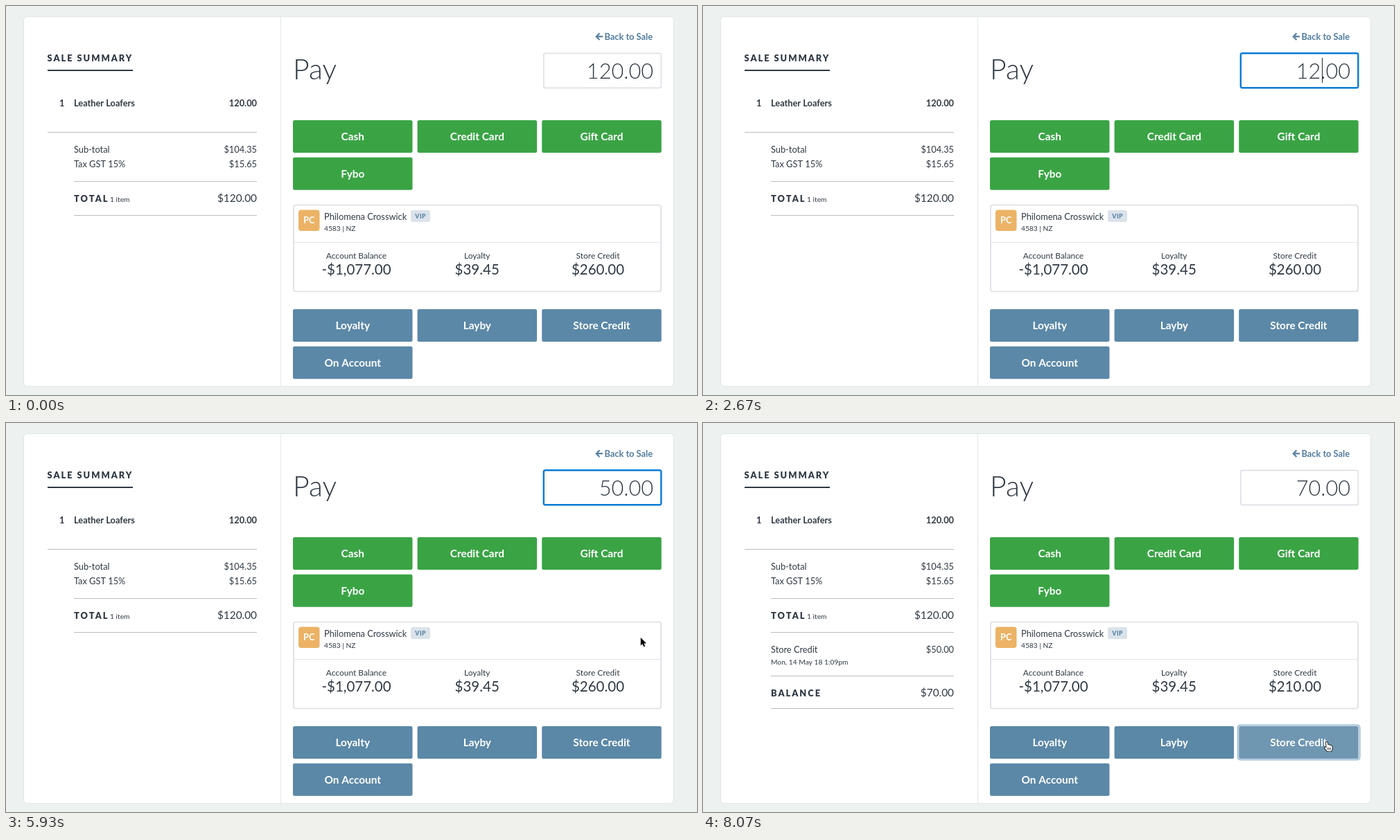
Animation, 997 px wide and 562 px high, one loop 8.59 s. Source, as an HTML page with a canvas:

```html
<!DOCTYPE html>
<html lang="en">
<head>
<meta charset="utf-8">
<title>Pay</title>
<style>
html, body { margin: 0; width: 100%; height: 100%; overflow: hidden; background: #edf1f0; }
canvas { display: block; }
</style>
</head>
<body>
<canvas id="stage" width="997" height="562"></canvas>
<script>
const ctx = document.getElementById('stage').getContext('2d');
const LOOP = 8590;
const INK = '#2f3944', GREEN = [58, 164, 69], BLUE = [91, 136, 167];
const EDGE = [221, 224, 230], FOCUS = [10, 123, 214];

// Key moments in ms
const CLICK = 1670, PRESS = 7200, PAID = 7470;
const KEYS = [
  [0, '120'], [2530, '12'], [2870, '1'], [3180, ''], [3870, '5'], [4060, '50'], [PAID, '70']
];

const clamp = v => Math.max(0, Math.min(1, v));
const ramp = (t, from, span) => clamp((t - from) / span);
const smooth = p => p * p * (3 - 2 * p);
const lerp = (a, b, p) => a + (b - a) * p;
const mix = (a, b, p) => `rgb(${a.map((v, i) => Math.round(lerp(v, b[i], p)))})`;
const lighten = (c, p) => mix(c, [255, 255, 255], p);

function text(str, x, y, size, { weight = 400, color = INK, align = 'left', spacing = 0 } = {}) {
  ctx.font = `${weight} ${size}px Lato, sans-serif`;
  ctx.letterSpacing = spacing + 'px';
  ctx.textAlign = align;
  ctx.fillStyle = color;
  ctx.fillText(str, x, y);
}

function box(x, y, w, h, r, fill, stroke, width = 1) {
  ctx.beginPath();
  ctx.roundRect(x, y, w, h, r);
  if (fill) { ctx.fillStyle = fill; ctx.fill(); }
  if (stroke) { ctx.strokeStyle = stroke; ctx.lineWidth = width; ctx.stroke(); }
}

function rule(x, y, w, h = 1, color = '#b9bcc0') {
  ctx.fillStyle = color;
  ctx.fillRect(x, y, w, h);
}

function row(label, amount, y, weight = 400) {
  text(label, 98, y, 12.8, { weight });
  text(amount, 362, y, 12.8, { weight, align: 'right' });
}

function totalRow(label, amount, y) {
  text(label, 98, y, 12.8, { weight: 900, spacing: 2 });
  text(amount, 362, y, 15.36, { align: 'right' });
}

function button(label, col, y, color, glow = 0) {
  const x = 414 + col * 179.6;
  box(x, y, 172.5, 47, 2.5, lighten(color, glow * 0.13));
  text(label, x + 86.25, y + 28.7, 15.36, { weight: 700, color: '#fff', align: 'center' });
}

function stat(label, value, x) {
  text(label, x, 364.7, 11.95, { align: 'center' });
  text(value, x, 387.7, 20.48, { align: 'center' });
}

function summary(paid) {
  text('SALE SUMMARY', 59.5, 80, 12.8, { weight: 900, spacing: 2 });
  rule(60, 92, 123, 2, INK);
  text('1', 77, 144.5, 12.8, { weight: 700 });
  row('Leather Loafers', '120.00', 144.5, 700);
  rule(60, 182, 302);
  row('Sub-total', '$104.35', 212);
  row('Tax GST 15%', '$15.65', 233.3);
  rule(98, 253, 264);
  totalRow('TOTAL', '$120.00', 282.8);
  text('1 item', 150, 282.8, 10.24);
  rule(98, 302, 264);
  if (!paid) return;
  row('Store Credit', '$50.00', 332);
  text('Mon, 14 May 18 1:09pm', 98, 348.5, 10.24);
  rule(98, 365, 264);
  totalRow('BALANCE', '$70.00', 394.5);
  rule(98, 412, 264);
}

function customer(paid) {
  box(415, 287.5, 530, 125, 3, '#fff', '#dddfe6', 1.7);
  rule(416, 341, 528, 1, '#e3e5ea');
  box(422, 294.5, 30.5, 30.5, 4, '#ecb366');
  text('PC', 437.3, 314.4, 12.8, { weight: 700, color: '#fff', align: 'center' });
  text('Philomena Crosswick', 459, 309.4, 12.8);
  box(584, 295, 28, 17, 3, '#dbe2ea');
  text('VIP', 598.2, 306.6, 8.6, { weight: 900, color: '#5b88a7', align: 'center', spacing: 0.5 });
  text('4583 | NZ', 459, 324.6, 10.24);
  stat('Account Balance', '-$1,077.00', 505.5);
  stat('Loyalty', '$39.45', 679.7);
  stat('Store Credit', paid ? '$210.00' : '$260.00', 854);
}

function backLink() {
  ctx.strokeStyle = '#5b83a3';
  ctx.lineWidth = 2.3;
  ctx.beginPath();
  ctx.moveTo(856.4, 39.4);
  ctx.lineTo(851.8, 44.2);
  ctx.lineTo(856.4, 49);
  ctx.moveTo(852, 44.2);
  ctx.lineTo(861, 44.2);
  ctx.stroke();
  text('Back to Sale', 933, 48.5, 12.8, { weight: 700, color: '#517c9e', align: 'right' });
}

function amount(t) {
  const [since, whole] = KEYS.findLast(k => k[0] <= t);
  const focus = ramp(t, CLICK - 20, 130) * (1 - ramp(t, PRESS, 130));
  const width = lerp(1.7, 2.4, focus);
  box(775.8, 68.3, 169.5, 50, 2.5, '#fff', mix(EDGE, FOCUS, focus), width);
  text(whole + '.00', 934, 105, 30.7, { weight: 300, align: 'right' });
  if (t < CLICK || t >= PRESS) return;
  const blink = t - Math.max(since, CLICK);
  if (blink % 1000 < 500) rule(893, 75, 1, 36, '#20262c');
}

function pointer(t) {
  if (t < 70 || (t >= 2530 && t < 5000)) return null;
  if (t < 2530) {
    const enter = 1 - (1 - ramp(t, 0, 600)) ** 2;
    const settle = smooth(ramp(t, 1000, 530));
    return [lerp(1004, 899, enter) - 5.5 * settle, lerp(128, 98, enter) - 1.5 * settle];
  }
  const p = smooth(ramp(t, 5000, 1670));
  return [lerp(893.5, 900, p) + 19 * 4 * p * (1 - p), lerp(96.5, 461, p)];
}

function shape(points, x, y, fill, stroke, width) {
  ctx.beginPath();
  points.forEach(([dx, dy]) => ctx.lineTo(x + dx, y + dy));
  ctx.closePath();
  ctx.lineJoin = 'round';
  ctx.strokeStyle = stroke;
  ctx.lineWidth = width;
  ctx.stroke();
  ctx.fillStyle = fill;
  ctx.fill();
  ctx.lineJoin = 'miter';
}

const ARROW = [[0, 0], [0, 11.5], [2.6, 9.2], [4.4, 13.3], [6.4, 12.4], [4.7, 8.5], [8.2, 8.3]];
const HAND = [
  [-1, 0], [0.8, 0], [1.6, 4], [3.2, 3.8], [4.2, 4.7], [5.6, 4.5], [6.5, 5.6], [7.7, 6],
  [8, 9], [6.6, 13.2], [0.6, 13.2], [-2.8, 8.6], [-2.6, 7.2], [-0.4, 8]
];

function beam(x, y) {
  ctx.strokeStyle = '#30363c';
  ctx.lineWidth = 1;
  ctx.beginPath();
  ctx.moveTo(x - 3, y - 6.5);
  ctx.quadraticCurveTo(x, y - 6.5, x, y - 4);
  ctx.lineTo(x, y + 4);
  ctx.quadraticCurveTo(x, y + 6.5, x - 3, y + 6.5);
  ctx.moveTo(x + 3, y - 6.5);
  ctx.quadraticCurveTo(x, y - 6.5, x, y - 4);
  ctx.moveTo(x, y + 4);
  ctx.quadraticCurveTo(x, y + 6.5, x + 3, y + 6.5);
  ctx.stroke();
}

function hand(x, y) {
  shape(HAND, x, y, '#fff', '#15191d', 1.8);
  ctx.lineWidth = 0.8;
  ctx.beginPath();
  for (const dx of [1.4, 3.4, 5.4]) {
    ctx.moveTo(x + dx, y + 8);
    ctx.lineTo(x + dx, y + 11.5);
  }
  ctx.stroke();
}

function cursor(at) {
  if (!at) return;
  const [x, y] = at;
  const inCol = x > 773 && x < 946;
  if (inCol && y > 68 && y < 119) beam(x, y);
  else if (inCol && ((y > 165 && y < 212) || y > 438)) hand(x, y);
  else shape(ARROW, x, y, '#000', '#fff', 1.8);
}

function draw(t) {
  const paid = t >= PAID;
  ctx.fillStyle = '#edf1f0';
  ctx.fillRect(0, 0, 997, 562);
  box(25.5, 15.5, 938, 534, 5, '#fff', '#e0e5e6');
  rule(396, 16, 1, 533, '#e3e7e9');

  summary(paid);
  backLink();
  text('Pay', 414, 105.5, 41, { weight: 300 });
  amount(t);

  const giftGlow = ramp(t, 5480, 100) * (1 - ramp(t, 5640, 120));
  button('Cash', 0, 165, GREEN);
  button('Credit Card', 1, 165, GREEN);
  button('Gift Card', 2, 165, GREEN, giftGlow);
  button('Fybo', 0, 218.8, GREEN);
  customer(paid);

  const ring = ramp(t, PRESS, 130);
  if (ring) {
    ctx.globalAlpha = ring;
    box(771.6, 436.4, 176, 50.2, 4, null, '#9fbfd9', 2);
    ctx.globalAlpha = 1;
  }
  button('Loyalty', 0, 438, BLUE);
  button('Layby', 1, 438, BLUE);
  button('Store Credit', 2, 438, BLUE, ramp(t, 6400, 350));
  button('On Account', 0, 491.8, BLUE);

  cursor(pointer(t));
}

function tick() {
  draw(performance.now() % LOOP);
  requestAnimationFrame(tick);
}
tick();
</script>
</body>
</html>
```
